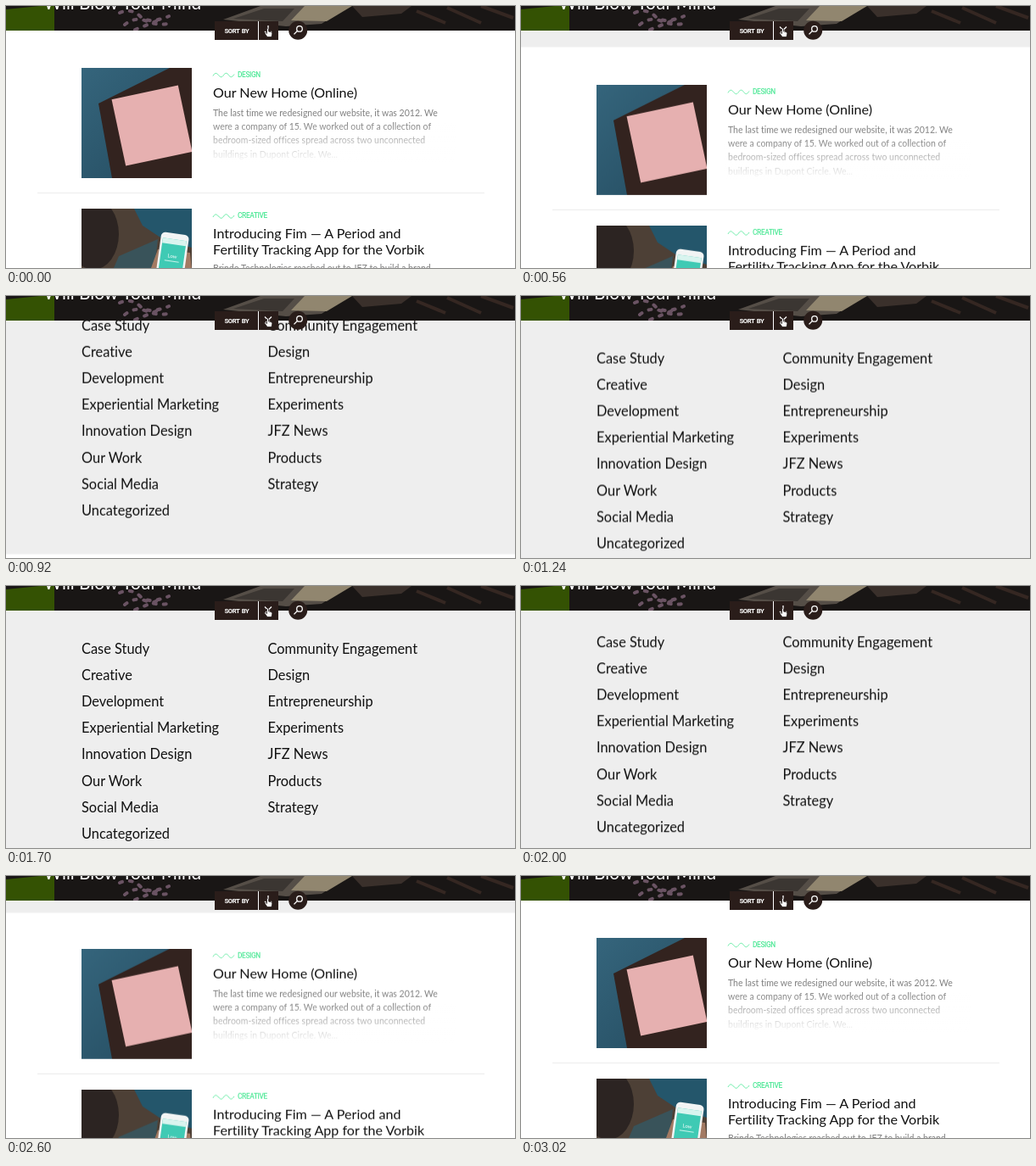
These frames come from a looping animation (600x309 px, 3.04 s). An HTML page:

```html
<!DOCTYPE html>
<html lang="en">
<head>
<meta charset="utf-8">
<title>Sort menu</title>
<style>
  html, body { margin: 0; width: 100%; height: 100%; overflow: hidden; background: #fff; }
  svg.stage { display: block; width: 600px; height: 309px; }
  text { font-family: Lato, "Open Sans", sans-serif; font-variant-ligatures: none; fill: #111; }
  .menu { font-size: 16.4px; }
  .title { font-size: 16.1px; }
  .body { font-size: 10.5px; fill: #808080; }
  .tag { font: 500 8.4px Roboto, sans-serif; letter-spacing: -.4px; fill: #4de896; }
  .sort { font: 700 7.8px Roboto, sans-serif; letter-spacing: -.45px; word-spacing: 1px; fill: #fff; }
  .hero { font-size: 20.8px; fill: #fff; }
  .wave { fill: none; stroke: #5cea9f; stroke-width: .9; }
  .icon { fill: none; stroke: #fff; stroke-width: 1.3; }

  .panel, .list, .down, .close { animation: 3040ms infinite linear; }
  .panel { animation-name: panel; }
  .list { animation-name: list; }
  .down, .close { transform-origin: 309px 28.5px; }
  .down { animation-name: down; }
  .close { animation-name: close; }

  /* opens 265-1296 ms, closes 1786-2880 ms */
  @keyframes panel {
    0%, 94.74%, 100% { transform: translateY(-315px); }
    8.72% { transform: translateY(-315px); animation-timing-function: cubic-bezier(.83, 0, .17, 1); }
    42.63% { transform: translateY(0); }
    58.75% { transform: translateY(0); animation-timing-function: cubic-bezier(.83, 0, .17, 1); }
  }
  /* the list closes from a slightly smaller offset, set while out of view */
  @keyframes list {
    0%, 94.74%, 100% { transform: translateY(0); }
    8.72% { transform: translateY(0); animation-timing-function: cubic-bezier(.83, 0, .17, 1); }
    42.63%, 58.74% { transform: translateY(315px); }
    58.75% { transform: translateY(274px); animation-timing-function: cubic-bezier(.83, 0, .17, 1); }
  }
  @keyframes down {
    0%, 8.7%, 64%, 100% { opacity: 1; transform: rotate(0); }
    14%, 58.6% { opacity: 0; transform: rotate(90deg); }
  }
  @keyframes close {
    0%, 8.7%, 64%, 100% { opacity: 0; transform: rotate(-90deg); }
    14%, 58.6% { opacity: 1; transform: rotate(0); }
  }
</style>
</head>
<body>
<svg class="stage" viewBox="0 0 600 309">
  <defs>
    <linearGradient id="fade" x2="0" y2="1">
      <stop offset="0" stop-color="#fff" stop-opacity="0"/>
      <stop offset="1" stop-color="#fff"/>
    </linearGradient>
    <linearGradient id="wall" x2="1" y2="1">
      <stop offset="0" stop-color="#35657c"/>
      <stop offset="1" stop-color="#234a5e"/>
    </linearGradient>
    <path id="squiggle" class="wave" d="M244 82.5 c2 -4 4 -4 6.500 -1 s4 3 6 0 s4 -3 6 0 s4 3 6.500 -1"/>
  </defs>

  <g class="list">
    <svg x="89" y="73" width="130" height="130" viewBox="0 0 130 130">
      <rect width="130" height="130" fill="url(#wall)"/>
      <path d="M20 42 L104 0 H130 V130 H36 Z" fill="#33231f"/>
      <rect x="43" y="28" width="80" height="80" fill="#e6b0b0" transform="rotate(-12 83 68)"/>
    </svg>
    <use href="#squiggle"/>
    <text class="tag" x="273" y="83.6">DESIGN</text>
    <text class="title" x="244" y="108">Our New Home (Online)</text>
    <text class="body">
      <tspan x="244" y="129.6">The last time we redesigned our website, it was 2012. We</tspan>
      <tspan x="244" y="146">were a company of 15. We worked out of a collection of</tspan>
      <tspan x="244" y="162.3">bedroom-sized offices spread across two unconnected</tspan>
      <tspan x="244" y="178.7">buildings in Dupont Circle. We...</tspan>
    </text>
    <rect x="240" y="138" width="290" height="47" fill="url(#fade)"/>

    <path d="M37 220.5 H564" stroke="#ededed"/>

    <svg x="89" y="239" width="130" height="130" viewBox="0 0 130 130">
      <rect width="130" height="130" fill="#4d4036"/>
      <ellipse cx="14" cy="30" rx="30" ry="42" fill="#2c2422"/>
      <path d="M62 0 H130 V46 L96 36 L72 20 Z" fill="#24566b"/>
      <path d="M44 56 L90 36 L86 70 H38 Z" fill="#39535a"/>
      <path d="M82 70 L90 48 L128 52 L130 74 Z" fill="#a37a63"/>
      <g transform="rotate(8 106 60)">
        <rect x="90" y="29" width="33" height="66" rx="5" fill="#f2f4f4"/>
        <rect x="92.500" y="36" width="28" height="50" fill="#3fcab4"/>
        <rect x="92.500" y="36" width="28" height="6" fill="#d9f4ef"/>
        <text x="106.500" y="58" font-size="6" text-anchor="middle" style="fill:#fff">Low</text>
        <path d="M98 62 H115" stroke="#c8f3ea"/>
      </g>
    </svg>
    <use href="#squiggle" y="166.500"/>
    <text class="tag" x="273" y="250">CREATIVE</text>
    <text class="title">
      <tspan x="244" y="274">Introducing Fim — A Period and</tspan>
      <tspan x="244" y="292.500">Fertility Tracking App for the Vorbik</tspan>
    </text>
    <text class="body" x="244" y="312.800">Brindo Technologies reached out to JFZ to build a brand</text>
  </g>

  <g class="panel">
    <rect y="28.500" width="600" height="315" fill="#eee"/>
    <text class="menu" y="79.800">
      <tspan x="89">Case Study</tspan>
      <tspan x="89" dy="31.150">Creative</tspan>
      <tspan x="89" dy="31.150">Development</tspan>
      <tspan x="89" dy="31.150">Experiential Marketing</tspan>
      <tspan x="89" dy="31.150">Innovation Design</tspan>
      <tspan x="89" dy="31.150">Our Work</tspan>
      <tspan x="89" dy="31.150">Social Media</tspan>
      <tspan x="89" dy="31.150">Uncategorized</tspan>
    </text>
    <text class="menu" y="79.800">
      <tspan x="308.500">Community Engagement</tspan>
      <tspan x="308.500" dy="31.150">Design</tspan>
      <tspan x="308.500" dy="31.150">Entrepreneurship</tspan>
      <tspan x="308.500" dy="31.150">Experiments</tspan>
      <tspan x="308.500" dy="31.150">JFZ News</tspan>
      <tspan x="308.500" dy="31.150">Products</tspan>
      <tspan x="308.500" dy="31.150">Strategy</tspan>
    </text>
  </g>

  <svg width="600" height="29">
    <rect width="600" height="29" fill="#191615"/>
    <path d="M0 4 L40 0 H57 V29 H0 Z" fill="#345203"/>
    <path d="M134 8 q14 -6 24 4 t34 0 M140 22 q12 -10 26 -4 t28 2 M152 28 l30 -12" fill="none"
          stroke="#6a5363" stroke-width="4" stroke-linecap="round" stroke-dasharray="3 9"/>
    <path d="M256 16 L300 0 H404 L372 21 L330 24 Z" fill="#554e47"/>
    <path d="M336 17 L352 0 H408 L378 18 Z" fill="#91866f"/>
    <path d="M268 15 L304 3 H340 L326 18 Z" fill="#3b3632"/>
    <path d="M408 0 H478 L466 9 L420 13 Z" fill="#3a302b"/>
    <path d="M484 6 l34 14 M520 2 l40 18 M560 0 l38 14" stroke="#352722" stroke-width="4"/>
    <text class="hero" x="44.500" y="4">Will Blow Your Mind</text>
  </svg>

  <rect x="246" y="18" width="75" height="22" fill="#2a1d1a"/>
  <path d="M297.500 18 V40" stroke="#fff"/>
  <text class="sort" x="257.500" y="32">SORT BY</text>
  <path class="icon down" d="M309 23 V34 M305 30 L309 34 L313 30"/>
  <path class="icon close" d="M305 24.500 L313 32.500 M313 24.500 L305 32.500"/>
  <path d="M307.500 27 q1 -1.500 2 0 v3 l3 .8 q1.500 .5 1.300 2 l-.8 3.700 h-5 l-2.800 -4 q0 -1.300 1.300 -.8 l1 .8 Z"
        fill="#fff" stroke="#1a1210" stroke-width=".7"/>
  <circle cx="344.200" cy="28.800" r="11" fill="#2a1d1a"/>
  <path class="icon" d="M343.600 29.300 L339.500 33.400"/>
  <circle class="icon" cx="346" cy="26.900" r="3.300"/>
</svg>
</body>
</html>
```
